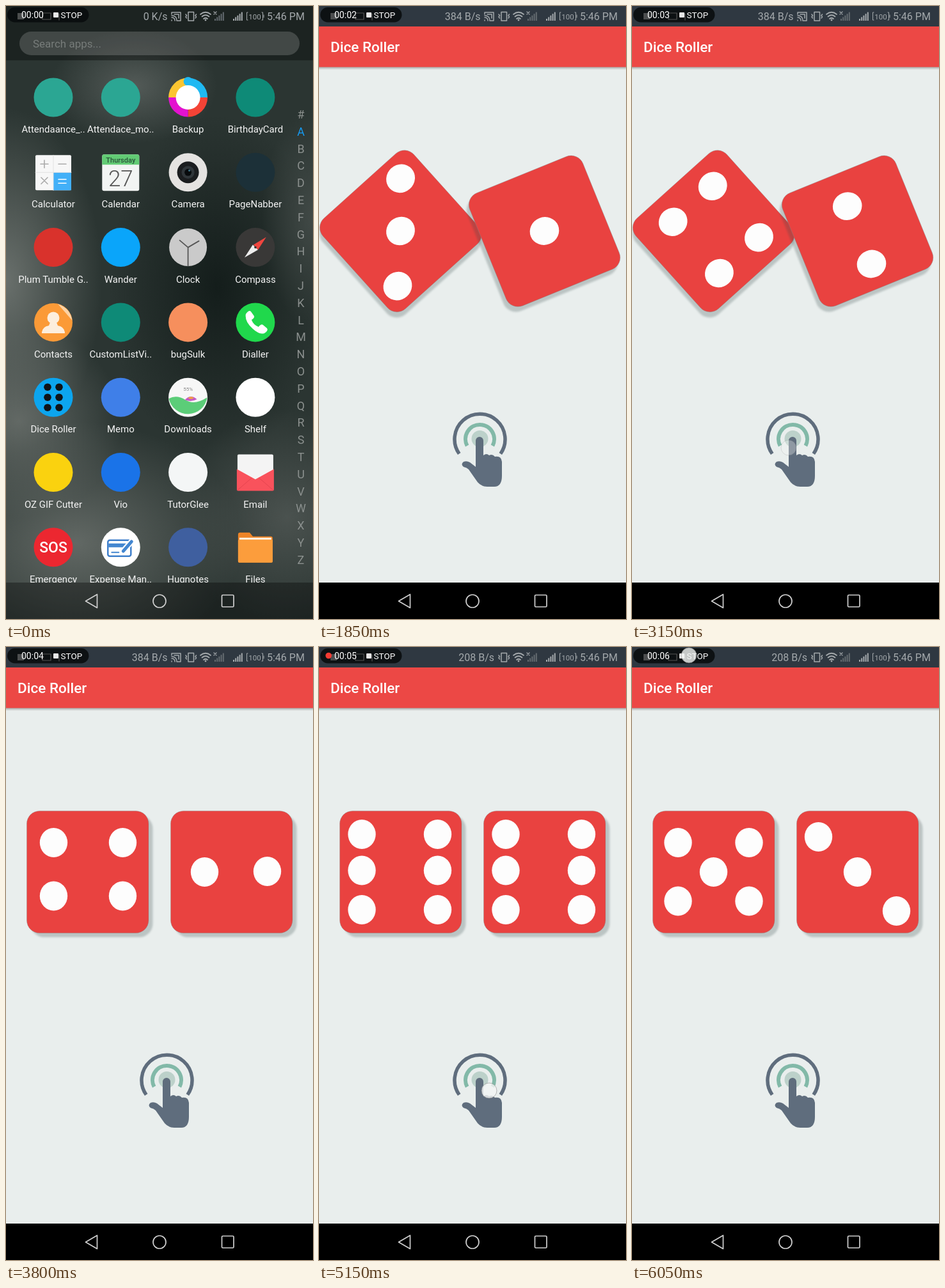
Animation, 480 px wide and 959 px high, one loop 6.15 s. Source, as an HTML page:

```html
<!DOCTYPE html>
<html lang="en">
<head>
<meta charset="utf-8">
<title>Dice Roller</title>
<style>
html, body { margin: 0; width: 100%; height: 100%; overflow: hidden; background: #000; }
svg { display: block; width: 100%; height: 100%; font-family: Roboto, "Noto Sans", sans-serif; }
.mid { text-anchor: middle; }
.end { text-anchor: end; }
.line { fill: none; stroke-linecap: round; stroke-linejoin: round; }
</style>
</head>
<body>
<svg id="stage" viewBox="0 0 480 959" preserveAspectRatio="none"></svg>
<script>
const LOOP = 6150, STEP = 50, SPIN = 500, LEAD = 24;

const circle = (x, y, r, fill, more = '') => `<circle cx="${x}" cy="${y}" r="${r}" fill="${fill}" ${more}/>`;
const rect = (x, y, w, h, fill, more = '') => `<rect x="${x}" y="${y}" width="${w}" height="${h}" fill="${fill}" ${more}/>`;
const path = (d, fill, more = '') => `<path d="${d}" fill="${fill}" ${more}/>`;
const line = (d, stroke, width, more = '') => `<path class="line" d="${d}" stroke="${stroke}" stroke-width="${width}" ${more}/>`;
const text = (x, y, size, fill, s, more = '') => `<text x="${x}" y="${y}" font-size="${size}" fill="${fill}" ${more}>${s}</text>`;
const at = (x, y, body) => `<g transform="translate(${x} ${y})">${body}</g>`;
const disc = (fill, r = 30.5) => circle(0, 0, r, fill);

// Launcher icons, each centred on 0,0
const backup = ['#20b9f2', '#f44336', '#e312cf', '#fbc531'].map((c, i) =>
    path('M0 0V-30.5A30.5 30.5 0 0 1 30.5 0Z', c, `transform="rotate(${i * 90})"`)).join('') +
  circle(0, -25, 7, '#20b9f2') + circle(0, 0, 19, '#fff');

const calculator = rect(-28, -27, 56, 55, '#f7f7f7', 'rx="2"') + rect(0, 0, 28, 28, '#42b0f8') +
  line('M-20-13h12m-6-6v12M8-13h12M-19 8l10 10m0-10l-10 10', '#aaa', 1.6) +
  line('M8 11h12m-12 6h12', '#fff', 1.6) + line('M0-27v55M-28 0h56', '#e2e2e2', 1);

const calendar = rect(-29, -28, 58, 57, '#f2f4f3', 'rx="3"') + path('M-29-12v-13q0-3 3-3h52q3 0 3 3v13z', '#62cb74') +
  text(0, -15, 11, '#29543a', 'Thursday', 'class="mid" font-weight="500"') +
  text(0, 22, 35, '#555', '27', 'class="mid" font-weight="300"');

const camera = disc('#e5e3e1', 30) + circle(0, 0, 17, '#1b1d1f') + circle(0, 0, 10, '#30363a') +
  circle(0, 0, 5.5, '#080b0d') + circle(2, -3, 1.6, '#3a6d80');

const clock = disc('#cacaca', 29.5) + line('M0 0L-13-11M0 0L17-10M0 0V29', '#555', 1.8);

const compass = disc('#393837') + path('M17-16L-3-4 4 4Z', '#f0453f') + path('M-17 16L-4-4 4 4Z', '#eee') + circle(0, 0, 1.8, '#333');

const contacts = disc('#fb9a37', 30) + path('M7-29Q27-22 29.5-3Z', '#fcd2a4') + circle(0, -7, 9.5, '#fdeedd') +
  path('M-18 17q0-10 11-12l2-5H5l2 5q11 2 11 12z', '#fdeedd');

const dialler = disc('#20d84c') +
  path('M-15-13q5-7 8-4l5 7q1 3-4 6 3 8 11 11 4-5 7-3l6 5q3 4-4 8-7 3-18-7-13-11-11-23z', '#fff');

const dice = disc('#0ca5ef') + [-9, 9].map(x => [-16, 0, 16].map(y => circle(x, y, 5.8, '#101418')).join('')).join('');

const downloads = disc('#f7f7f7') + path('M-30 2Q-18-5-4 4T30 0A30.5 30.5 0 0 1-30 2Z', '#5bcd78') +
  path('M-5 4Q4-6 14 3 5 8-5 4Z', '#c45bc4') + path('M0 1Q5-3 9 1 5 4 0 1Z', '#f1a53b') +
  text(0, -10, 8, '#888', '55%', 'class="mid"');

const email = rect(-28, -28, 56, 52, '#f4f4f4', 'rx="2"') + path('M-29-5L0 11 29-5V27q0 2-2 2H-27q-2 0-2-2Z', '#f9525c') +
  line('M-28 28L-6 9M28 28L6 9', '#e6444f', 1);

const sos = disc('#ec2730') + text(0, 8.5, 23, '#fff', 'SOS', 'class="mid" font-weight="500"');

const expense = disc('#fff') + rect(-20, -11, 36, 25, '#fff', 'rx="3" stroke="#3e7fcb" stroke-width="2.5"') +
  rect(-19, -6, 34, 6, '#4386d0') + line('M-14 8h11', '#4386d0', 2) +
  line('M3 7L17-9', '#fff', 9) + line('M4 6L17-9', '#4386d0', 5);

const files = path('M-27-20q0-3 3-3h15l5 6h28q3 0 3 3v36q0 2-2 2h-50q-2 0-2-2z', '#ef8528') +
  rect(-25, -15, 50, 12, '#fff4e4') + rect(-27, -12, 54, 36, '#fc9d3c', 'rx="2"');

const apps = [
  ['Attendaance_..', disc('#2ba693')], ['Attendace_mo..', disc('#2ba693')], ['Backup', backup], ['BirthdayCard', disc('#0e8a77')],
  ['Calculator', calculator], ['Calendar', calendar], ['Camera', camera], ['PageNabber', disc('#1c3038')],
  ['Plum Tumble G..', disc('#d9322c')], ['Wander', disc('#0aa5fa')], ['Clock', clock], ['Compass', compass],
  ['Contacts', contacts], ['CustomListVi..', disc('#0e8a77')], ['bugSulk', disc('#f68f5d')], ['Dialler', dialler],
  ['Dice Roller', dice], ['Memo', disc('#3f7fe8')], ['Downloads', downloads], ['Shelf', disc('#fff')],
  ['OZ GIF Cutter', disc('#fad20f')], ['Vio', disc('#1a73e8')], ['TutorGlee', disc('#f4f6f6')], ['Email', email],
  ['Emergency', sos], ['Expense Man..', expense], ['Hugnotes', disc('#3f5f9f')], ['Files', files]
];

const blobs = [[0, 430, 150, 270, '#747a76'], [110, 840, 260, 190, '#6b716d'], [200, 125, 130, 90, '#5a615e'],
  [20, 650, 160, 150, '#6a706c'], [330, 440, 170, 270, '#101917'], [480, 330, 80, 170, '#454d4a'], [440, 800, 170, 170, '#505754']];

const launcher = rect(0, 0, 480, 959, '#2b3532') +
  blobs.map(([x, y, rx, ry, c], i) =>
    `<radialGradient id="b${i}"><stop stop-color="${c}" stop-opacity=".85"/><stop offset="1" stop-color="${c}" stop-opacity="0"/></radialGradient>
     <ellipse cx="${x}" cy="${y}" rx="${rx}" ry="${ry}" fill="url(#b${i})"/>`).join('') +
  rect(0, 0, 480, 85, '#000', 'opacity=".35"') +
  rect(21, 40, 438, 37, '#fff', 'rx="18.5" opacity=".17"') + text(42, 65, 17, '#777c7a', 'Search apps...') +
  `<svg width="480" height="902">` + apps.map(([name, icon], i) => at(74 + i % 4 * 105.3, 143 + (i >> 2) * 117.3,
    icon + text(0, 55, 15, '#f4f4f4', name, 'class="mid"'))).join('') + '</svg>' +
  [...'#ABCDEFGHIJKLMNOPQRSTUVWXYZ'].map((c, i) =>
    text(461, 176 + i * 26.8, 18, c === 'A' ? '#159cf5' : '#8b908e', c, 'class="mid"')).join('') +
  rect(0, 902, 480, 57, '#000', 'opacity=".35"');

// Dice screen
const faces = [[], [[0, 0]], [[-42, 0], [56, -1]], [[-61, -55], [0, 0], [61, 61]],
  [[-53, -46], [55, -46], [-53, 37.5], [55, 37.5]],
  [[-55.5, -46], [55.5, -46], [-55.5, 45.5], [55.5, 45.5], [0, 0]],
  [-60.5, 58].flatMap(x => [-59, -2.5, 59].map(y => [x, y]))];

const die = (id, x) => at(x, 352, `<g id="${id}">` +
  rect(-89, -89, 191, 191, '#35484a', 'rx="21" opacity=".25" filter="url(#soft)"') +
  rect(-95, -95.5, 190.5, 191, '#e94240', 'rx="20" stroke="#7d8c8d" stroke-opacity=".5" stroke-width=".7"') +
  `<g id="${id}Pips" fill="#fdfdfd"></g></g>`);

const hand = line('M219.2 700.5A39.5 39.5 0 1 1 283.8 700.5', '#5f6d7d', 5.5, 'style="stroke-linecap:butt"') +
  line('M231.6 688A22.5 22.5 0 1 1 271.4 688', '#82b9a8', 6, 'style="stroke-linecap:butt"') +
  circle(251.5, 677, 13, '#bcd1ca') +
  path('M245 680a6 6 0 0 1 12 0V703q5-4 9 0 5-3 9 2 10-2 11 8V735q0 17-12 17H263q-9 0-15-7L234 725q-3-3-8-4-5-4 0-8 5-2 10 1l9 7Z', '#5f6d7d');

const app = rect(0, 0, 480, 959, '#fafafa') + rect(0, 0, 480, 32, '#2f3841') +
  `<g id="content">` + rect(0, 32, 480, 870, '#e9eeed') + rect(0, 95, 480, 5, 'url(#drop)') +
  rect(0, 32, 480, 63.5, '#ec4845') + text(18, 72, 22.5, '#fff', 'Dice Roller', 'font-weight="500"') +
  die('left', 127.5) + die('right', 352.5) + hand + '</g>' + rect(0, 902, 480, 57, '#000');

// System bars
const GREY = '#a4a9ac';
const bars = (x, c) => [0, 1, 2, 3, 4].map(i => rect(x + i * 3.2, 20 - i * 2.6, 2, 3 + i * 2.6, c)).join('');
const system = text(0, 22, 16, GREY, '', 'id="speed" class="end"') +
  `<g id="cast">` + line('M259 13v-3h14v13h-6M259 22v1M259 18q5 0 5 5M259 15q8 0 8 8M263 13h7v6', GREY, 1.5) + '</g>' +
  line('M285 9.5h8.5v13.5h-8.5zM281 13l1.5 2-1.5 2 1.5 2M297.5 13l-1.5 2 1.5 2-1.5 2', GREY, 1.5) +
  line('M304 13q8-6.5 16 0M306.5 16.5q5.5-4.5 11 0M309 20q3-2.5 6 0', GREY, 1.8) + circle(312, 22, 1.4, GREY) +
  bars(326, '#646b70') + line('M325 9l4 4m0-4l-4 4', GREY, 1.2) + bars(355, GREY) +
  line('M378 10h-1.5v12h1.5M400 10h1.5v12h-1.5M403 14v4', GREY, 1) + text(389, 20.5, 11.5, GREY, '100', 'class="mid"') +
  text(408, 22, 16, GREY, '5:46 PM') +
  rect(2, 2, 127.5, 23.5, '#080b0c', 'rx="11.8" opacity=".86"') +
  rect(18, 11, 10, 10, '#777', 'opacity=".6"') + line('M57 11h13v10h-13zM83 12v10', '#555', 1.2) +
  circle(15, 13.5, 4.8, '#f43b32', 'id="rec"') + text(24, 18.5, 14, '#fff', '', 'id="timer"') +
  rect(74, 10, 8, 8, '#e8e8e8', 'rx="1"') + text(85.5, 18.5, 13.5, '#fff', 'STOP') +
  line('M124.5 931L142.5 920.5V941.5Z', '#d0d0d0', 1.7) + circle(240, 931, 10, 'none', 'stroke="#d0d0d0" stroke-width="1.7"') +
  rect(337.5, 921.5, 18.5, 18.5, 'none', 'rx="1.5" stroke="#d0d0d0" stroke-width="1.7"');

const $ = id => document.getElementById(id);
$('stage').innerHTML = `<defs><filter id="soft"><feGaussianBlur stdDeviation="1.8"/></filter>
  <linearGradient id="drop" x2="0" y2="1"><stop stop-color="#000" stop-opacity=".3"/><stop offset="1" stop-color="#000" stop-opacity="0"/></linearGradient></defs>` +
  launcher + `<g id="app">${app}</g>` + system +
  circle(0, 0, 12, '#f4f6f5', 'id="touch" stroke="#777" stroke-opacity=".6"');

// [start, left face, right face]
const rolls = [[-SPIN, 1, 1], [1731, 3, 1], [2400, 2, 5], [3031, 4, 2], [4334, 6, 6], [5430, 5, 3]];
// [from, to, x, y]
const touches = [[50, 250, 76, 614], [1600, 1800, 250, 690], [2250, 2450, 248, 692], [2900, 3190, 245, 691],
  [4200, 4400, 256, 692], [5100, 5430, 266, 694], [5950, 6250, 89, 13]];

const clamp = x => Math.min(1, Math.max(0, x));
const set = (id, name, value) => $(id).setAttribute(name, value);

function pose(id, face, elapsed) {
  set(id, 'transform', `rotate(${180 * (1 - Math.cos(Math.PI * clamp(elapsed / SPIN)))})`);
  $(id + 'Pips').innerHTML = faces[face].map(([x, y]) => `<ellipse cx="${x}" cy="${y}" rx="21.7" ry="23"/>`).join('');
}

function draw(t) {
  const open = clamp((t - 250) / 300), scale = 1 - 0.75 * (1 - open) ** 3;
  set('app', 'opacity', clamp(open * 2));
  set('app', 'transform', `translate(${74 * (1 - scale)} ${612 * (1 - scale)}) scale(${scale})`);
  set('content', 'opacity', t < 750 ? 0 : t < 900 ? 0.5 : t < 950 ? 0.88 : 1);

  const [start, l, r] = rolls.findLast(roll => t >= roll[0]);
  pose('left', l, t - start);
  pose('right', r, t - start + LEAD);

  const casting = t < 4100;
  set('cast', 'opacity', +casting);
  set('speed', 'x', casting ? 252.5 : 274);
  $('speed').textContent = t < 1500 ? '0 K/s' : t < 4800 ? '384 B/s' : '208 B/s';
  $('timer').textContent = '00:0' + Math.floor((t + 450) / 1000);
  set('rec', 'opacity', +(t >= 4200 && t < 5600 && (t - 4200) % 650 < 450));

  const touch = touches.find(([from, to]) => t >= from && t < to);
  set('touch', 'opacity', touch ? 0.8 * clamp((touch[1] - t) / 100) : 0);
  if (touch) set('touch', 'transform', `translate(${touch[2]} ${touch[3]})`);
}

const begin = performance.now();
(function tick() {
  const t = (performance.now() - begin) % LOOP;
  draw(Math.floor(t / STEP) * STEP);
  requestAnimationFrame(tick);
})();
</script>
</body>
</html>
```
